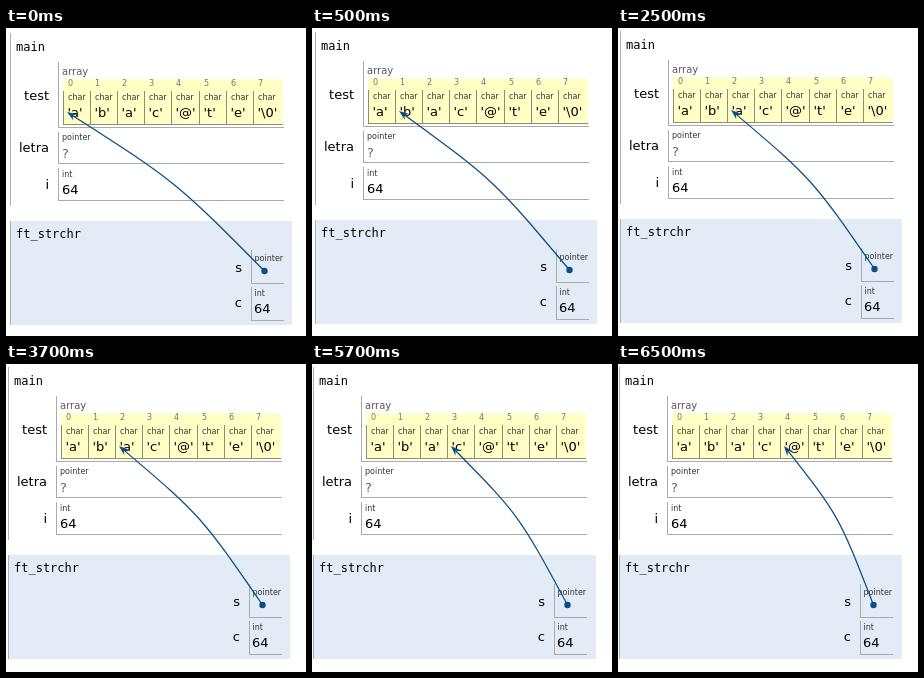
Recreate the animation shown at these times as an HTML page. Size 300x308 px, loop 8 s.

```html
<!DOCTYPE html>
<html lang="en">
<head>
<meta charset="utf-8">
<title>Pointer walking through a string</title>
<style>
  html, body { margin: 0; width: 100%; height: 100%; overflow: hidden; background: #fff; }
  svg { display: block; width: 300px; height: 308px; }
  text { font-family: "DejaVu Sans", Verdana, sans-serif; font-size: 13px; fill: #000; }
  .mono { font-family: "DejaVu Sans Mono", monospace; font-size: 12px; }
  .type { font-size: 8px; fill: #333; }
  .index { font-size: 8px; fill: #77776c; }
  .kind { font-size: 10px; fill: #555; }
  .unset { fill: #666; }
  .name { text-anchor: end; }
</style>
</head>
<body>
<svg id="stage" viewBox="0 0 300 308"></svg>
<script>
const NS = "http://www.w3.org/2000/svg";
const LOOP = 8000;
const INK = "#0b4d86", RULE = "#aaa", EDGE = "#a6b3b6";
const cellX = [57, 84, 111, 138, 165, 193, 220, 247];
const chars = ["a", "b", "a", "c", "@", "t", "e", "\\0"];

// start time, view offset, right edge of the lower panel
const steps = [
  { at: 0, dx: 0, dy: 0, right: 286 },
  { at: 500, dx: -1, dy: -1, right: 285 },
  { at: 2500, dx: -2, dy: -2, right: 284 },
  { at: 4500, dx: -3, dy: -2, right: 284 },
  { at: 6500, dx: -3, dy: -2, right: 284 }
];

function add(parent, tag, attrs, content) {
  const el = document.createElementNS(NS, tag);
  for (const key in attrs) el.setAttribute(key, attrs[key]);
  if (content !== undefined) el.textContent = content;
  return parent.appendChild(el);
}

const view = add(document.getElementById("stage"), "g", {});
const rect = (x, y, width, height, fill) => add(view, "rect", { x, y, width, height, fill });
const label = (x, y, s, cls = "") => add(view, "text", { x, y, class: cls }, s);

// a value slot: left and bottom rule
function slot(x, top, bottom, right, color = RULE) {
  rect(x, top, 1, bottom - top, color);
  rect(x, bottom - 1, right - x, 1, color);
}

// upper stack frame
rect(4, 5, 1, 173, EDGE);
label(10, 23, "main", "mono");
label(43, 72, "test", "name");
slot(52, 34, 100, 278);
label(56, 47, "array", "kind");
rect(57, 51.5, 220, 45.5, "#ffffc6");
cellX.forEach((x, i) => {
  const right = i < 7 ? cellX[i + 1] : 277;
  slot(x, 63, 97, right, "#8c8c78");
  label(x + 5, 58, i, "index");
  label(x + 5, 72, "char", "type");
  label(x + 4.5, 89, `'${chars[i]}'`);
});
label(43, 124, "letra", "name");
slot(52, 104, 136, 278);
label(56, 112, "pointer", "type");
label(56, 130, "?", "unset");
label(43, 161, "i", "name");
slot(52, 140, 173, 278);
label(56, 149, "int", "type");
label(56, 166, "64");

// lower stack frame
const panel = rect(4, 193, 282, 104, "#e2ebf6");
rect(4, 193, 1, 104, EDGE);
label(10, 210, "ft_strchr", "mono");
label(236, 244, "s", "name");
slot(245, 222, 256, 278);
label(248.5, 233, "pointer", "type");
label(236, 279, "c", "name");
slot(245, 259, 293, 278);
label(248.5, 268, "int", "type");
label(248, 285, "64");

// pointer arrow
const from = { x: 258.5, y: 243 };
const BOW = 10;
const curve = add(view, "path", { fill: "none", stroke: INK, "stroke-width": 1.25 });
const head = add(view, "path", { d: "M0 0L-10 -3.7L-6.5 0L-10 3.7Z", fill: INK });
add(view, "circle", { cx: from.x, cy: from.y, r: 3.2, fill: INK });

function pointAt(i) {
  const x = cellX[i] + 4, y = 84;
  const cx = (from.x + x) / 2 + BOW, cy = (from.y + y) / 2 - BOW;
  const angle = Math.atan2(y - cy, x - cx);
  const endX = x - 6 * Math.cos(angle), endY = y - 6 * Math.sin(angle);
  curve.setAttribute("d", `M${from.x} ${from.y}C${cx} ${cy} ${cx} ${cy} ${endX} ${endY}`);
  head.setAttribute("transform", `translate(${x} ${y}) rotate(${angle * 180 / Math.PI})`);
}

function draw(time) {
  let i = steps.length - 1;
  while (steps[i].at > time) i--;
  const { dx, dy, right } = steps[i];
  view.setAttribute("transform", `translate(${dx} ${dy})`);
  panel.setAttribute("width", right - dx - 4);
  pointAt(i);
}

const start = performance.now();
function tick() {
  draw((performance.now() - start) % LOOP);
  requestAnimationFrame(tick);
}
tick();
</script>
</body>
</html>
```
